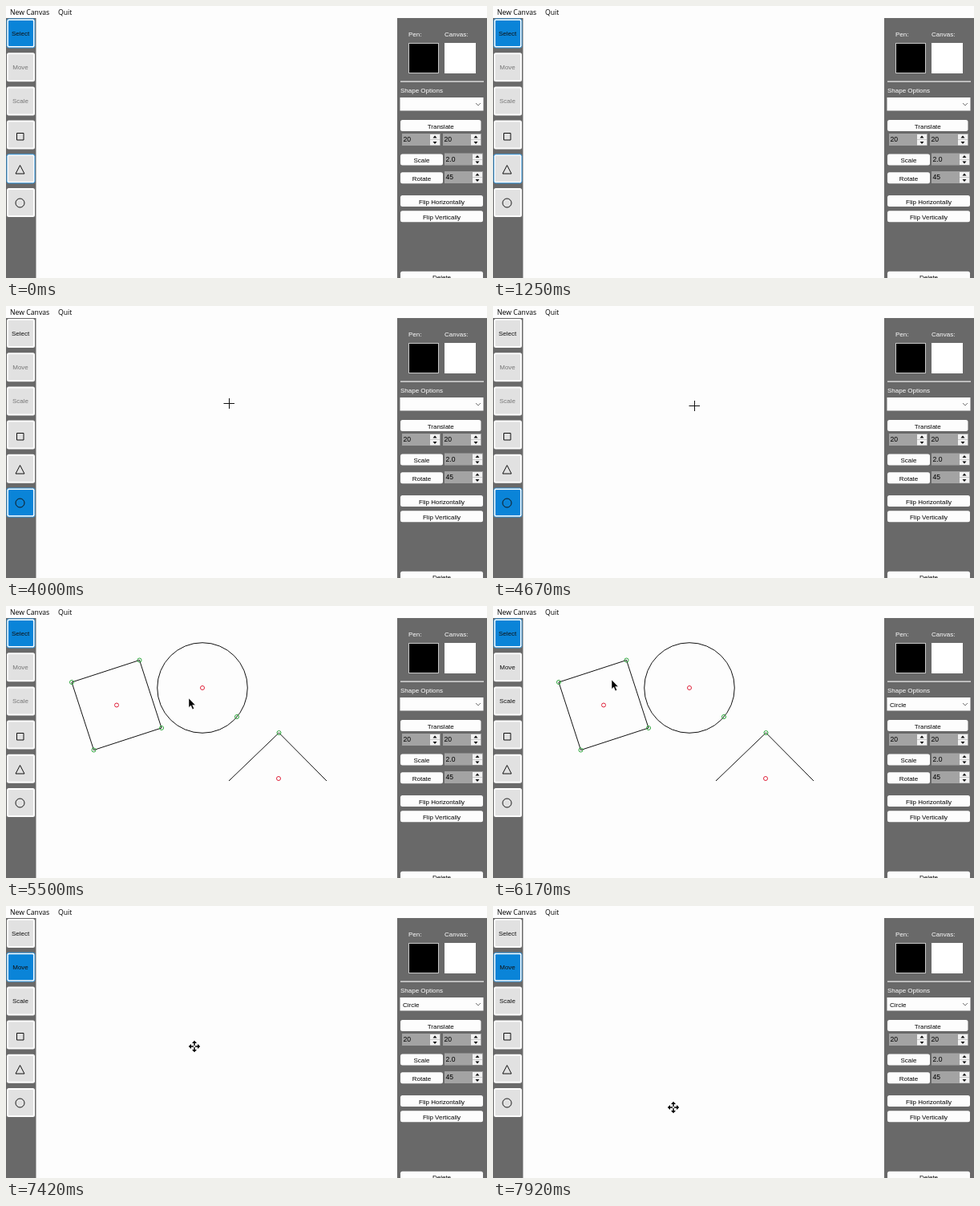
An HTML page for the animation above (8 s loop, 600x339 px).

```html
<!DOCTYPE html>
<html lang="en">
<head>
<meta charset="utf-8">
<title>Drawing app</title>
<style>
  html, body { margin: 0; width: 100%; height: 100%; overflow: hidden; background: #fdfdfd; }
  svg { display: block; width: 600px; height: 339px; font: 8px "Liberation Sans", Arial, sans-serif; }
  .menu { font: 8.7px "Open Sans", sans-serif; }
  .num { font-size: 8.6px; }
  .mid { text-anchor: middle; }
  .line { fill: none; stroke: #111; stroke-width: 1; }
</style>
</head>
<body>
<svg id="stage" viewBox="0 0 600 339"></svg>
<script>
const LOOP = 8000, STEP = 1000 / 12;
const stage = document.getElementById('stage');

const rect = (x, y, w, h, fill, more = '') =>
  `<rect x="${x}" y="${y}" width="${w}" height="${h}" fill="${fill}" ${more}/>`;
const text = (x, y, s, more = '') => `<text x="${x}" y="${y}" ${more}>${s}</text>`;
const path = (d, more = 'class="line"') => `<path d="${d}" ${more}/>`;
const ring = (x, y, r, color) =>
  `<circle cx="${x}" cy="${y}" r="${r}" fill="none" stroke="${color}"/>`;

// Toolbar on the left
const tools = ['Select', 'Move', 'Scale', 'square', 'triangle', 'circle'];
const toolTop = i => 16 + i * 42.2;
const icons = {
  square: path('M13.5 158.5h8.5v8.5h-8.5z'),
  triangle: path('M17.5 198.5L23 209H12z'),
  circle: ring(17.5, 245.5, 5.5, '#111')
};
const toolButton = (name, i) =>
  rect(1, toolTop(i), 35, 36, '#fcfcfc', `rx="2.5" id="edge${i}"`) +
  rect(3, toolTop(i) + 2, 31, 32, '#e1e1e1', `rx="1" id="tool${i}"`) +
  (icons[name] || text(18, toolTop(i) + 21, name, `class="mid" id="label${i}"`));

// Controls on the right
const button = (x, y, w, s) =>
  rect(x, y, w, 14, '#fdfdfd', 'rx="2.5"') + text(x + w / 2, y + 10.5, s, 'class="mid"');
const spinner = (x, y, s) =>
  rect(x, y, 48, 15, '#a3a3a3') +
  text(x + 1.5, y + 10, s, 'class="num"') +
  rect(x + 35, y + 1, 12, 6.5, '#f2f2f2') + rect(x + 35, y + 8, 12, 6.5, '#f2f2f2') +
  path(`M${x + 38.5} ${y + 5.5}l2.5-3 2.5 3zM${x + 38.5} ${y + 10}l2.5 3 2.5-3z`, 'fill="#111"');

stage.innerHTML =
  rect(0, 0, 600, 339, '#fdfdfd') +
  rect(0, 15, 37.5, 324, '#696969') + rect(488, 15, 112, 324, '#696969') +
  text(5, 10.5, 'New Canvas', 'class="menu"') + text(65, 10.5, 'Quit', 'class="menu"') +
  tools.map(toolButton).join('') +
  text(502, 37.5, 'Pen:', 'fill="#fff"') + text(547, 37.5, 'Canvas:', 'fill="#fff"') +
  rect(502.5, 46.5, 37, 37, '#000', 'stroke="#c8c8c8"') + rect(547, 46, 39, 38, '#fff') +
  rect(492, 93.5, 104, 1.3, '#e8e8e8') +
  text(492, 107.5, 'Shape Options', 'fill="#fff"') +
  rect(491.5, 114, 104, 16.5, '#fdfdfd') + text(495, 125.5, 'Circle', 'id="choice"') +
  path('M586 121l3 3 3-3', 'fill="none" stroke="#777"') +
  button(492, 142, 100.5, 'Translate') +
  spinner(494, 159, '20') + spinner(545, 159, '20') +
  button(492, 184.5, 53, 'Scale') + spinner(547, 183.5, '2.0') +
  button(492, 207.3, 53, 'Rotate') + spinner(547, 206, '45') +
  button(492, 236, 103, 'Flip Horizontally') + button(492, 255.3, 103, 'Flip Vertically') +
  button(492, 330.7, 103, 'Delete') +
  '<g id="shapes"></g><g id="cursor"></g>';

const el = id => document.getElementById(id);

// Pointer path: time, x, y
const route = [
  [1670, 18, 204], [1840, 18, 162], [2000, 82, 95], [2330, 194, 152], [2400, 194, 152],
  [2580, 18, 204], [2830, 165, 225], [2990, 278, 218], [3250, 400, 218], [3300, 400, 218],
  [3510, 18, 246], [4000, 278, 121], [4080, 245, 102], [4400, 288, 138], [4600, 288, 138],
  [5080, 18, 34], [5500, 228, 115], [5830, 240, 104], [6000, 240, 104],
  [6400, 18, 76], [6830, 295, 136], [7080, 245, 99], [7750, 225, 251]
];
// Clicked tool: time, index
const clicks = [[0, 0], [1840, 3], [2580, 4], [3510, 5], [5080, 0], [6400, 1]];
const PICK = 5880, GRAB = 7080;
const drags = [[2000, 2400], [2990, 3300], [4080, 4600], [GRAB, LOOP]];

function pointer(t) {
  const n = route.findIndex(p => p[0] > t);
  if (n < 0) return route[route.length - 1].slice(1);
  if (n === 0) return route[0].slice(1);
  const a = route[n - 1], b = route[n], k = (t - a[0]) / (b[0] - a[0]);
  return [a[1] + (b[1] - a[1]) * k, a[2] + (b[2] - a[2]) * k];
}

const node = (x, y) => ring(x, y, 2.5, '#2ca53a');
const hub = (x, y) => ring(x, y, 2.5, '#e0243c');

// Each shape is spanned by the start and end of a drag
function square(ax, ay, bx, by) {
  const cx = (ax + bx) / 2, cy = (ay + by) / 2, dx = bx - cx, dy = by - cy;
  const pts = [[ax, ay], [cx + dy, cy - dx], [bx, by], [cx - dy, cy + dx]];
  return path(`M${pts.join('L')}z`) + pts.map(p => node(...p)).join('') + hub(cx, cy);
}
function chevron(ax, ay, bx, by) {
  const cx = (ax + bx) / 2 + 1.5, top = ay - (bx - ax) / 2 + 1;
  return path(`M${ax} ${ay}L${cx} ${top}L${bx} ${by}`) + node(cx, top) + hub(cx - 0.5, ay - 3);
}
function disc(ax, ay, bx, by) {
  return ring(ax, ay, Math.hypot(bx - ax, by - ay) + 0.2, '#111') + node(bx, by) + hub(ax, ay);
}

function drawShapes(t) {
  const [px, py] = pointer(t);
  const end = (stop, x, y) => t < stop ? [px, py] : [x, y];
  let out = '';
  if (t >= 2000) out += square(82, 95, ...end(2330, 194, 152));
  if (t >= 2990) out += chevron(278, 218, ...end(3250, 400, 218));
  if (t >= 4080) {
    const [bx, by] = end(4400, 288, 138);
    const mx = t > GRAB ? px - 245 : 0, my = t > GRAB ? py - 99 : 0;
    out += disc(245 + mx, 102 + my, bx + mx, by + my);
  }
  return out;
}

const cursors = {
  arrow: path('M0 0v11.5l2.6-2.4 2 4.6 2-.9-2-4.4h3.6z', 'fill="#000" stroke="#fff" stroke-width=".5"'),
  cross: path('M-6.5 .5H7M.5-6V7'),
  move: path('M-5 0H5M0-5V5', 'stroke="#000" stroke-width="1.5"') +
    [0, 90, 180, 270].map(a => path('M0-7.2l3 3.2h-6z', `transform="rotate(${a})"`)).join('') +
    '<circle r="1.2" fill="#fff"/>'
};

function render(now) {
  const tick = Math.floor((now % LOOP + 5) / STEP), t = tick * STEP;
  const [x, y] = pointer(t);
  const mode = clicks.filter(c => c[0] <= t).pop()[1];
  const picked = t >= PICK;

  tools.forEach((name, i) => {
    const over = x < 37 && y >= toolTop(i) && y < toolTop(i) + 36;
    el('tool' + i).setAttribute('fill', i === mode ? '#0a84d8' : '#e1e1e1');
    el('edge' + i).setAttribute('stroke', over || i === mode ? '#2b8fd6' : 'none');
    const label = el('label' + i);
    if (label) label.setAttribute('fill', i === 0 || picked ? '#111' : '#777');
  });
  el('choice').setAttribute('visibility', picked ? 'visible' : 'hidden');

  // Outside Select mode the canvas is only repainted now and then during a drag
  const dragging = drags.some(d => t >= d[0] && t < d[1]);
  const painted = mode === 0 || (dragging && tick % 3 === 1);
  el('shapes').innerHTML = painted ? drawShapes(t) : '';

  const kind = x < 38 || mode === 0 ? 'arrow' : mode === 1 ? 'move' : 'cross';
  el('cursor').innerHTML = t < route[0][0] ? '' : cursors[kind];
  el('cursor').setAttribute('transform', `translate(${Math.round(x)} ${Math.round(y)})`);
}

const start = performance.now();
function loop() {
  render(performance.now() - start);
  requestAnimationFrame(loop);
}
loop();
</script>
</body>
</html>
```
